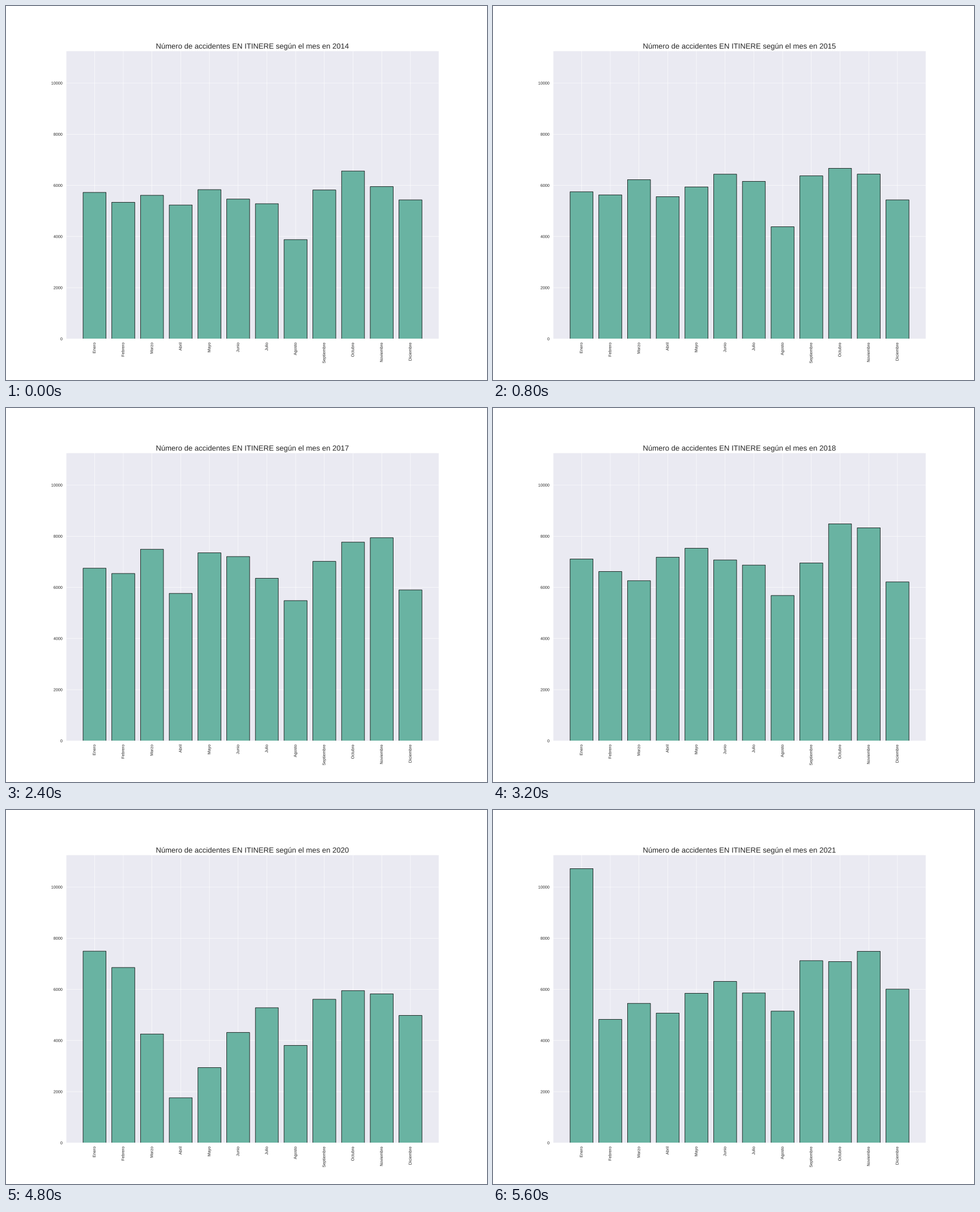
A matplotlib script for the animation above (6.4 s loop, 849x660 px).

```python
import matplotlib.pyplot as plt
import numpy as np
from matplotlib.animation import FuncAnimation
from matplotlib.patheffects import Normal
from matplotlib.text import Text

DPI = 100
K = 849 / 18 / DPI  # layout designed for an 18 x 14 inch page
INK = "0.15"
FIRST_YEAR, YEAR_COUNT = 2014, 8

MONTHS = ["Enero", "Febrero", "Marzo", "Abril", "Mayo", "Junio", "Julio",
          "Agosto", "Septiembre", "Octubre", "Noviembre", "Diciembre"]

# Share of the yearly daily rate that each month gets.
SEASON = [0.98, 1.045, 1.04, 1.07, 1.02, 1.045,
          0.965, 0.76, 1.065, 1.125, 1.15, 0.895]
EASTER = 0.86

# Accidents per weekday: (months since the first January, rate).
TREND = [(0, 254), (4, 260), (6, 238), (11, 264), (17, 280), (23, 264),
         (24, 299), (35, 293), (36, 313), (47, 314), (60, 332), (69, 346),
         (73, 328), (74, 186), (75, 87), (78, 238), (83, 242), (84, 521),
         (85, 231), (86, 228), (88, 273), (90, 276), (91, 308), (95, 292)]


def monthly_accidents():
    """Weekdays in each month times the trend, season and Easter factors."""
    count = 12 * YEAR_COUNT
    starts = np.datetime64(f"{FIRST_YEAR}-01", "M") + np.arange(count + 1)
    starts = starts.astype("datetime64[D]")
    weekdays = np.busday_count(starts[:-1], starts[1:])
    rate = np.interp(np.arange(count), *zip(*TREND))
    table = (weekdays * rate).reshape(YEAR_COUNT, 12) * SEASON
    for i in range(YEAR_COUNT):
        easter_month = 2 if FIRST_YEAR + i in (2016, 2018) else 3
        table[i, easter_month] *= EASTER
    return table


plt.rcParams.update({
    "font.family": "Liberation Sans",
    "text.hinting": "none",
    "axes.axisbelow": True,
})

accidents = monthly_accidents()
fig = plt.figure(figsize=(8.49, 6.6), dpi=DPI, facecolor="white")
ax = fig.add_axes([0.125, 0.11, 0.775, 0.77], facecolor="#EAEAF2")

bars = ax.bar(range(12), accidents[0], width=0.8, color="#69b3a2",
              edgecolor="black", linewidth=1.2 * K)
ax.set_xlim(-0.99, 11.99)
ax.set_ylim(0, 1.05 * accidents.max())
ax.set_xticks(range(12), MONTHS, rotation=90)
ax.set_yticks(range(0, 10001, 2000))
ax.tick_params(length=0, pad=9.5 * K, labelsize=11 * K, labelcolor=INK)
ax.grid(color="white", linewidth=K)
for spine in ax.spines.values():
    spine.set(color="white", linewidth=1.25 * K)
title = ax.set_title("", fontsize=20 * K, color=INK, pad=6 * K)

# Keep lines and glyphs at their exact subpixel places.
for artist in fig.findobj():
    artist.set_snap(False)
for text in fig.findobj(Text):
    text.set_path_effects([Normal()])


def draw(i):
    for bar, value in zip(bars, accidents[i]):
        bar.set_height(value)
    title.set_text("Número de accidentes EN ITINERE según el mes en "
                   f"{FIRST_YEAR + i}")
    return [*bars, title]


anim = FuncAnimation(fig, draw, frames=YEAR_COUNT, interval=800,
                     repeat=True, repeat_delay=0, blit=False)
plt.show()
```
